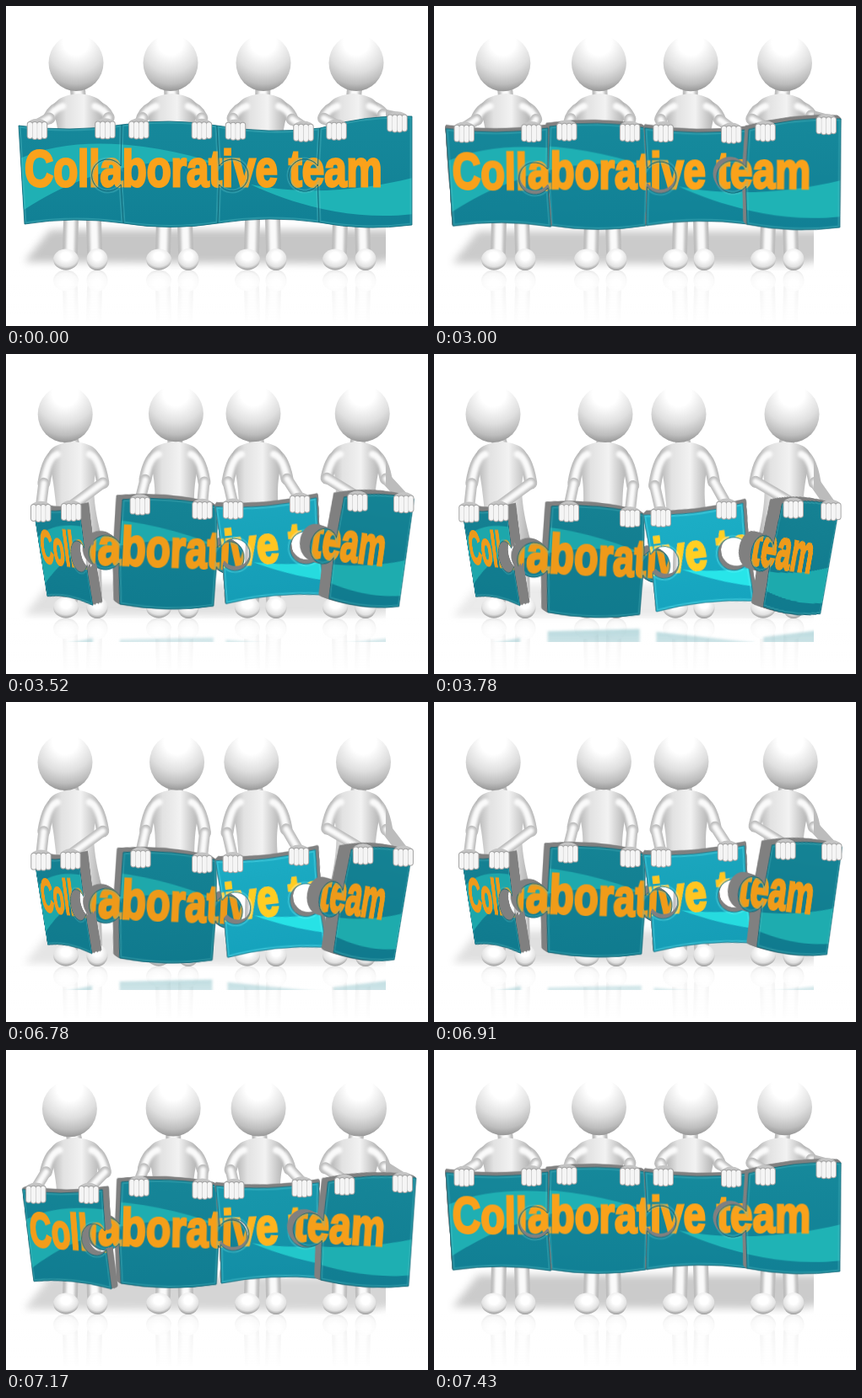
Recreate the animation shown at these times as an HTML page. Size 500x380 px, loop 7.56 s.

```html
<!DOCTYPE html>
<html lang="en">
<head>
<meta charset="utf-8">
<title>Collaborative team</title>
<style>
  html, body { margin: 0; width: 100%; height: 100%; overflow: hidden; background: #fff; }
  #stage { position: fixed; inset: 0; overflow: hidden; contain: strict; }
  svg, .piece { position: absolute; left: 0; top: 0; width: 500px; height: 380px; }
  .piece svg { transform-origin: 0 0; }
</style>
</head>
<body>
<div id="stage">
<svg>
  <defs>
    <radialGradient id="head" cx=".5" cy=".13" r=".93">
      <stop offset=".25" stop-color="#fff"/>
      <stop offset=".58" stop-color="#dfdfdf"/>
      <stop offset=".8" stop-color="#bdbdbd"/>
      <stop offset="1" stop-color="#858585"/>
    </radialGradient>
    <linearGradient id="torso">
      <stop offset="0" stop-color="#b0b0b0"/>
      <stop offset=".25" stop-color="#e2e2e2"/>
      <stop offset=".6" stop-color="#f2f2f2"/>
      <stop offset="1" stop-color="#acacac"/>
    </linearGradient>
    <radialGradient id="foot" cx=".5" cy=".35" r=".65">
      <stop offset=".3" stop-color="#fff"/>
      <stop offset=".75" stop-color="#e2e2e2"/>
      <stop offset="1" stop-color="#9a9a9a"/>
    </radialGradient>
    <linearGradient id="mirror" gradientUnits="userSpaceOnUse" x1="0" y1="318" x2="0" y2="376">
      <stop offset="0" stop-color="#5fa9b3" stop-opacity=".5"/>
      <stop offset="1" stop-color="#5fa9b3" stop-opacity=".08"/>
    </linearGradient>
    <linearGradient id="fade" x2="0" y2="1">
      <stop offset="0" stop-color="#fff" stop-opacity=".6"/>
      <stop offset="1" stop-color="#fff"/>
    </linearGradient>
    <linearGradient id="cloth" x2="0" y2="1">
      <stop offset="0" stop-color="#178a9c"/>
      <stop offset="1" stop-color="#107f94"/>
    </linearGradient>
    <filter id="soft" filterUnits="userSpaceOnUse" width="500" height="380"><feGaussianBlur stdDeviation="5"/></filter>
    <filter id="haze" filterUnits="userSpaceOnUse" width="500" height="380"><feGaussianBlur stdDeviation="1.7"/></filter>
    <g id="art">
      <rect y="110" width="500" height="170" fill="url(#cloth)"/>
      <path d="M10 184C70 154 160 158 255 188C190 178 100 186 10 250Z" fill="#1fb0b4"/>
      <path d="M290 212C360 226 430 218 490 202V246C420 256 350 240 290 212Z" fill="#1fb3b6"/>
      <!-- condensed poster lettering -->
      <text transform="translate(22 214) scale(.77 1)" font-family="Liberation Sans, Arial, sans-serif"
        font-size="61.5" font-weight="bold" fill="#faa21b" stroke="#faa21b" stroke-width="3">Collaborative team</text>
    </g>
  </defs>
</svg>
<svg id="people"></svg>
<div id="board"></div>
<svg id="hands"></svg>
</div>
<script>
const LOOP = 7560, STEP = 130, STEPS = 7, OPEN_AT = 3000, CLOSE_AT = 6780;
const THICKNESS = 15, VIEW = 900;

// Seams of the joined banner; knob is the side it bulges to
const SEAMS = [
  { top: [15, 142], bottom: [22, 259], knob: 0 },
  { top: [137, 141], bottom: [139, 258], knob: -1 },
  { top: [250, 142], bottom: [251, 258], knob: 1 },
  { top: [372, 145], bottom: [371, 257], knob: -1 },
  { top: [481, 131], bottom: [481, 260], knob: 0 }
];

// Each carrier and the fully open pose of their piece: centre, angles, size, head shift, light, time lead
const TEAM = [
  { head: 83, feet: [71, 108], x: 66, y: 238, turn: -63, tilt: -7.5, skew: 13.5, size: .95, lean: -13, light: -.05, lead: 1.3 },
  { head: 195, feet: [181, 216], x: 193, y: 247, turn: 22, tilt: 3, skew: 0, size: 1.05, lean: 8, light: -.05, lead: 1 },
  { head: 305, feet: [286, 320], x: 313, y: 242, turn: -18, tilt: -7, skew: 0, size: 1.02, lean: -15, light: .28, lead: 1 },
  { head: 415, feet: [390, 426], x: 437, y: 242, turn: 54, tilt: 10, skew: 0, size: 1.05, lean: 9, light: -.05, lead: 1 }
];

const $ = id => document.getElementById(id);
const mix = (a, b, k) => a + (b - a) * k;
const between = (p, q, k) => [mix(p[0], q[0], k), mix(p[1], q[1], k)];
const clamp = (v, lo, hi) => Math.min(Math.max(v, lo), hi);
const smooth = k => k * k * (3 - 2 * k);

function seam({ top, bottom, knob }, up) {
  const [from, to] = up ? [bottom, top] : [top, bottom];
  if (!knob) return `L${to}`;
  const x = (top[0] + bottom[0]) / 2 + knob * 2, reach = up ? -11 : 11;
  const sweep = (knob > 0) !== up ? 1 : 0;
  return `L${x} ${201 - reach}A19 19 0 1 ${sweep} ${x} ${201 + reach}L${to}`;
}

function outline(i) {
  const [a, b] = [SEAMS[i], SEAMS[i + 1]], wave = i % 2 ? -9 : 9;
  const bend = (p, q, bow) => { const [x, y] = between(p, q, .5); return `Q${x} ${y + bow} ${q}`; };
  return `M${a.top}` + bend(a.top, b.top, wave) + seam(b, false) + bend(b.bottom, a.bottom, -wave) + seam(a, true) + 'Z';
}

// Matrix that carries piece i from the joined banner to its pose
function pose(i, k) {
  const p = TEAM[i], [a, b] = [SEAMS[i], SEAMS[i + 1]];
  const home = between(between(a.top, b.top, .5), between(a.bottom, b.bottom, .5), .5);
  const view = new DOMMatrix([1, 0, 0, 0, 0, 1, 0, 0, 0, 0, 1, -1 / VIEW, 0, 0, 0, 1]);
  return new DOMMatrix()
    .translate(...between(home, [p.x, p.y], k))
    .rotate(p.tilt * k).skewY(p.skew * k)
    .multiply(view)
    .rotateAxisAngle(0, 1, 0, p.turn * k)
    .scale(mix(1, p.size, k))
    .translate(-home[0], -home[1]);
}

function project(matrix, [x, y]) {
  const p = matrix.transformPoint(new DOMPoint(x, y));
  return [p.x / p.w, p.y / p.w];
}

const pieces = [];
for (const i of [1, 2, 0, 3]) {
  const div = document.createElement('div'), d = outline(i);
  div.className = 'piece';
  div.innerHTML = `<svg><clipPath id="cut${i}"><path d="${d}"/></clipPath>
    <g clip-path="url(#cut${i})"><use href="#art"/>
    <path d="${d}" fill="none" stroke="#5fc3cb" stroke-opacity=".3" stroke-width="5"/></g>
    <path d="${d}" fill="none" stroke="#0b6375" stroke-opacity=".8" stroke-linejoin="round"/></svg>`;
  $('board').append(div);
  pieces[i] = div;
}

const line = (d, w, color, extra = '') =>
  `<path d="${d}" fill="none" stroke="${color}" stroke-width="${w}" stroke-linecap="round" stroke-linejoin="round" ${extra}/>`;
const shine = (d, w) => line(d, w * .55, '#fafafa', 'filter="url(#haze)"');
const limb = (d, w) => line(d, w, '#bcbcbc') + shine(d, w);
const oval = (x, y, rx, ry, fill) => `<ellipse cx="${x}" cy="${y}" rx="${rx}" ry="${ry}" fill="url(#${fill})"/>`;

const legs = ([a, b]) => limb(`M${a + 7} 215L${a + 5} 292`, 18) + limb(`M${b - 5} 215L${b - 3} 292`, 18) +
  oval(a, 301, 15, 12.5, 'foot') + oval(b, 301, 12.5, 13, 'foot');

function hand([x, y]) {
  const fingers = (color, w) => [-1.5, -.5, .5, 1.5].map(n =>
    line(`M${x + n * 5.7} ${y - 6}V${y + 9 - Math.abs(n)}`, w, color)).join('');
  return `<ellipse cx="${x}" cy="${y - 6}" rx="11.5" ry="7" fill="#c4c4c4"/>` + fingers('#a4a4a4', 7.4) + fingers('#f5f5f5', 5.4);
}

function person({ head, feet, lean }, k, grips) {
  const hx = head + lean * k, mid = (feet[0] + feet[1]) / 2, c = (hx + mid) / 2;
  const arms = grips.map(([x, y], n) => {
    const side = n ? 1 : -1, sx = c + side * 19, elbow = [sx + side * 16, (119 + y) / 2];
    return { upper: `M${sx} 119Q${sx + side * 11} 122 ${elbow}`, fore: `M${elbow}L${x} ${y - 6}` };
  });
  const half = side => `${c + side * 30} 126C${c + side * 22} 150 ${c + side * 22} 175 ${mid + side * 25} 222`;
  const body = `M${c} 104C${c - 20} 106 ${c - 32} 112 ${half(-1)}H${mid + 25}
    C${c + 22} 175 ${c + 22} 150 ${c + 30} 126C${c + 32} 112 ${c + 20} 106 ${c} 104Z`;
  return legs(feet) + arms.map(a => line(a.upper, 15, '#bcbcbc')).join('') +
    limb(`M${mix(hx, c, .5)} 95L${c} 114`, 18) + `<path d="${body}" fill="url(#torso)"/>` +
    arms.map(a => shine(a.upper, 15) + limb(a.fore, 13)).join('') +
    oval(hx, 67.5 + 4 * k, 32.5, 33.5, 'head');
}

function draw(u) {
  const ease = TEAM.map(p => smooth(Math.min(1, u * p.lead)));
  const poses = ease.map((k, i) => pose(i, k));
  const grips = poses.map((m, i) => [.18, .84].map(s => {
    const [x, y] = project(m, between(SEAMS[i].top, SEAMS[i + 1].top, s));
    return [x, y + 5];
  }));

  const shadow = `<path d="M22 304L52 266H462L478 298L430 306Z" fill="#777" opacity="${.42 - .27 * u}"
    filter="url(#soft)" transform="translate(0 ${8 * u})"/>`;
  const feet = `<g transform="matrix(1 0 0 -1 0 627)" opacity=".55">${TEAM.map(p => legs(p.feet)).join('')}</g>
    <rect y="314" width="500" height="66" fill="url(#fade)"/>`;
  const mirrors = poses.map((m, i) => {
    const [[x1, y1], [x2, y2]] = [i, i + 1].map(n => project(m, SEAMS[n].bottom));
    return `<path d="M${x1} ${636 - y1}L${x2} ${636 - y2}V375H${x1}Z" fill="url(#mirror)" filter="url(#haze)" opacity="${ease[i]}"/>`;
  }).join('') + '<rect y="375" width="500" height="5" fill="#fff"/>';

  $('people').innerHTML = shadow + feet + mirrors + TEAM.map((p, i) => person(p, ease[i], grips[i])).join('');
  $('hands').innerHTML = grips.flat().map(hand).join('');

  pieces.forEach((div, i) => {
    const face = div.firstChild, { turn, light } = TEAM[i], k = ease[i];
    const depth = -THICKNESS * Math.sin(turn * k * Math.PI / 180);
    face.style.transform = poses[i].toString();
    face.style.filter = `brightness(${1 + light * k})`;
    // Doubling shadows build a solid side wall
    div.style.filter = k ? [1, 2, 4, 8].map(n =>
      `drop-shadow(${depth * n / 15}px ${-3 * k * n / 15}px 0 #808080)`).join(' ') : 'none';
  });
}

function openness(t) {
  const stepsSince = start => clamp(Math.floor((t - start) / STEP) + 1, 0, STEPS);
  return (stepsSince(OPEN_AT) - stepsSince(CLOSE_AT)) / STEPS;
}

let shown;
function tick() {
  const u = openness(performance.now() % LOOP);
  if (u !== shown) draw(shown = u);
  requestAnimationFrame(tick);
}
tick();
</script>
</body>
</html>
```
